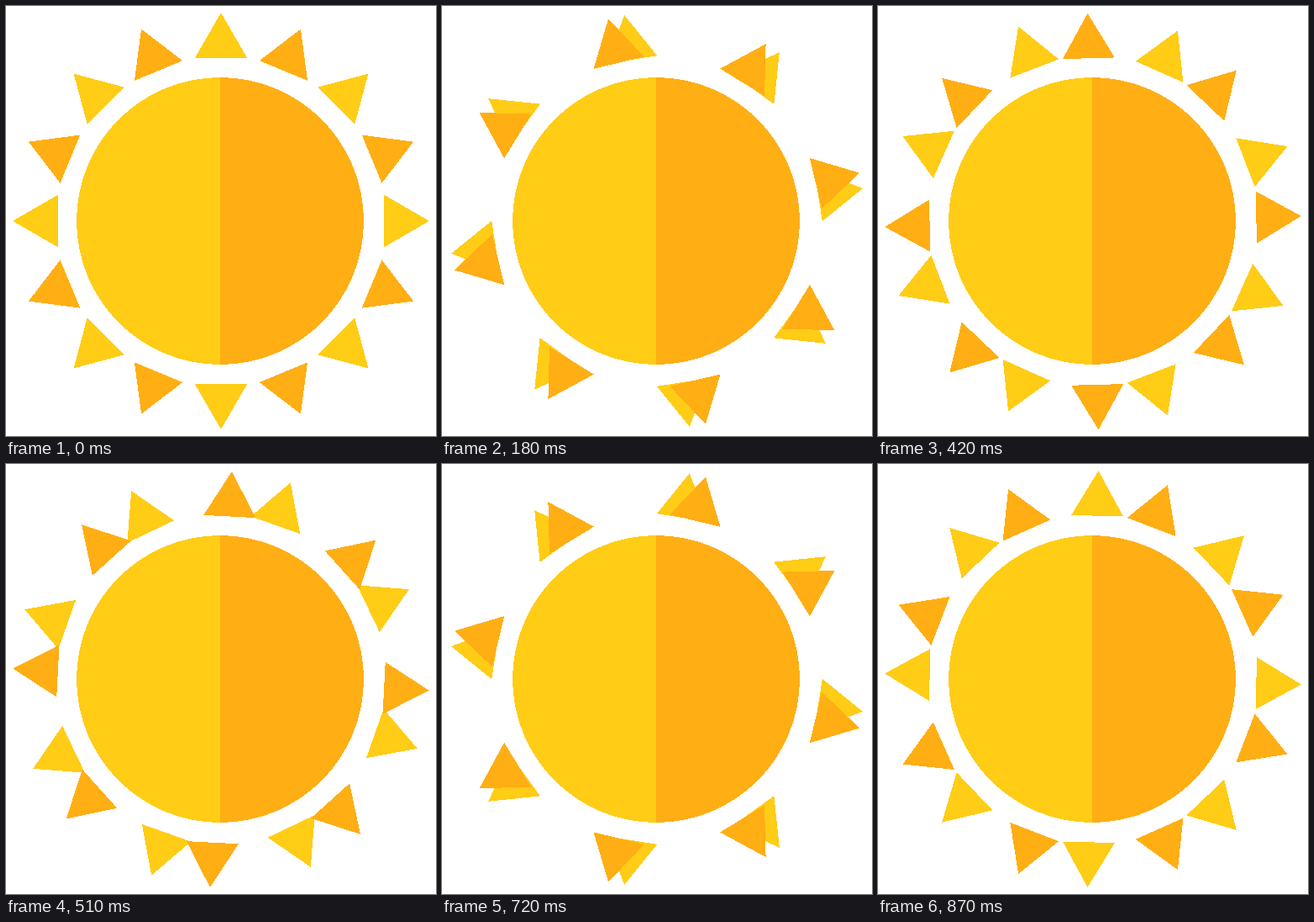
These frames come from a looping animation (512 px wide and 512 px high, 900 ms). An HTML page:

```html
<!DOCTYPE html>
<html lang="en">
<head>
<meta charset="utf-8">
<title>Sun</title>
<style>
  html, body { margin: 0; height: 100%; overflow: hidden; background: #fff; }
  svg { display: block; width: 100vw; height: 100vh; shape-rendering: crispEdges; }
  .light { fill: #ffcc16; }
  .dark { fill: #ffae14; }
</style>
</head>
<body>
<svg viewBox="0 0 512 512">
  <g id="lightRays" class="light"></g>
  <g id="darkRays" class="dark"></g>
  <circle class="light" cx="255" cy="256" r="171"/>
  <path class="dark" d="M255 85a171 171 0 0 1 0 342z"/>
</svg>
<script>
  const LOOP = 900, STEP = 30, RAYS = 8, GAP = 360 / RAYS;
  const lightRays = document.getElementById('lightRays');
  const darkRays = document.getElementById('darkRays');

  const ring = () => Array.from({ length: RAYS }, (_, i) =>
    `<path d="M0-248L31-194.4H-31z" transform="rotate(${i * GAP})"/>`).join('');
  lightRays.innerHTML = ring();
  darkRays.innerHTML = ring();

  const turn = (group, centerY, angle) =>
    group.setAttribute('transform', `translate(256 ${centerY}) rotate(${angle})`);

  // The rings counter-rotate by one ray gap per loop.
  function draw() {
    const time = Math.floor(performance.now() % LOOP / STEP) * STEP;
    const angle = GAP * time / LOOP;
    turn(lightRays, 256, -angle);
    turn(darkRays, 256.6, GAP / 2 + angle);
    requestAnimationFrame(draw);
  }
  draw();
</script>
</body>
</html>
```
